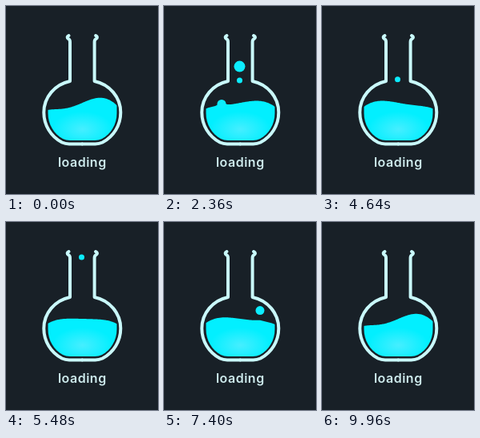
Animation, 190 px wide and 235 px high, one loop 10000 ms. Source, as an HTML page:

```html
<!DOCTYPE html>
<html lang="en">
<head>
<meta charset="utf-8">
<title>Loading</title>
<style>
  html, body { margin: 0; height: 100%; overflow: hidden; background: #182027; }
  svg { display: block; width: 190px; height: 235px; }
  text { font: 600 16px Inter, sans-serif; letter-spacing: .5px; fill: #cdeaec; text-anchor: middle; }
  #glass { fill: none; stroke: #c9f9fb; stroke-width: 4; stroke-linecap: round; stroke-linejoin: round; }
</style>
</head>
<body>
<svg viewBox="0 0 190 235">
  <defs>
    <radialGradient id="glow" gradientUnits="userSpaceOnUse" r="1" gradientTransform="translate(95.5 154) scale(38 22)" cx="0" cy="0">
      <stop offset="0" stop-color="#46eeff"/>
      <stop offset="1" stop-color="#02efff"/>
    </radialGradient>
    <clipPath id="bowl">
      <path d="M52.500 100V134C52.500 148 60 160 71 166Q75 168 80 168H111Q116 168 120 166C131 160 138.500 148 138.500 134V100Z"/>
    </clipPath>
  </defs>
  <path id="liquid" fill="url(#glow)" clip-path="url(#bowl)"/>
  <g id="bubbles" fill="#0cecff"></g>
  <g id="glass">
    <path id="half" d="M78.500 37Q75 39 78 41Q80 42 80 45V94C61 98 47.300 114 47.300 133C47.300 149 56 163 70 170.500Q74 172.400 79 172.400H95.300"/>
    <use href="#half" transform="translate(190.600) scale(-1 1)"/>
  </g>
  <text x="95.300" y="201">loading</text>
</svg>
<script>
const LOOP = 10000, STEP = 40, SWAY = 2000, POP = 60;
const CENTER = 95.5, HALF = 43, FLOOR = 126;
const liquid = document.getElementById('liquid');
const layer = document.getElementById('bubbles');
const bubbles = [];

// Speed is in pixels per millisecond
function addBubble(x, r, start, life, speed) {
  const node = document.createElementNS('http://www.w3.org/2000/svg', 'circle');
  node.setAttribute('cx', x);
  layer.append(node);
  bubbles.push({ x, r, start, life, speed, node });
}

// Each neck bubble climbs further than the one before
[1780, 3100, 4040].forEach((start, i) => addBubble(94.5, 3.5, start, 1000 + 130 * i * i, 0.057));
[2260, 3460, 6960].forEach((start, i) => addBubble([72, 75, 120][i], 5.5, start, 520, 0.035));
addBubble(94.5, 7, 960, 1560, 0.036);
addBubble(95, 2, 3400, 640, 0.035);
addBubble(94.5, 3.5, 6000, 560, 0.057);

function surface(x, sway) {
  const u = (x - CENTER) / HALF;
  return 121 + 6 * u ** 4 - 6.8 * sway * Math.sin(2.7 * u);
}

function draw(now) {
  const t = Math.floor(now % LOOP / STEP) * STEP;
  const sway = Math.cos(2 * Math.PI * t / SWAY);
  const bumps = [];

  for (const { x, r, start, life, speed, node } of bubbles) {
    const age = t - start;
    const alive = age >= 0 && age < life;
    const y = FLOOR - speed * age;
    node.setAttribute('cy', y);
    node.setAttribute('r', alive ? r * Math.min(1, (life - age) / POP) : 0);
    if (alive) {
      const gap = (y - surface(x, sway)) / 11;
      bumps.push({ x, width: r, height: 0.7 * r * Math.exp(-gap * gap) });
    }
  }

  let d = 'M52 170';
  for (let x = 52; x <= 139; x++) {
    let y = surface(x, sway);
    for (const b of bumps) y -= b.height * Math.exp(-(((x - b.x) / b.width) ** 2));
    d += `L${x} ${y.toFixed(2)}`;
  }
  liquid.setAttribute('d', d + 'V170Z');
}

const begin = performance.now();
function tick() {
  draw(performance.now() - begin);
  requestAnimationFrame(tick);
}
tick();
</script>
</body>
</html>
```
